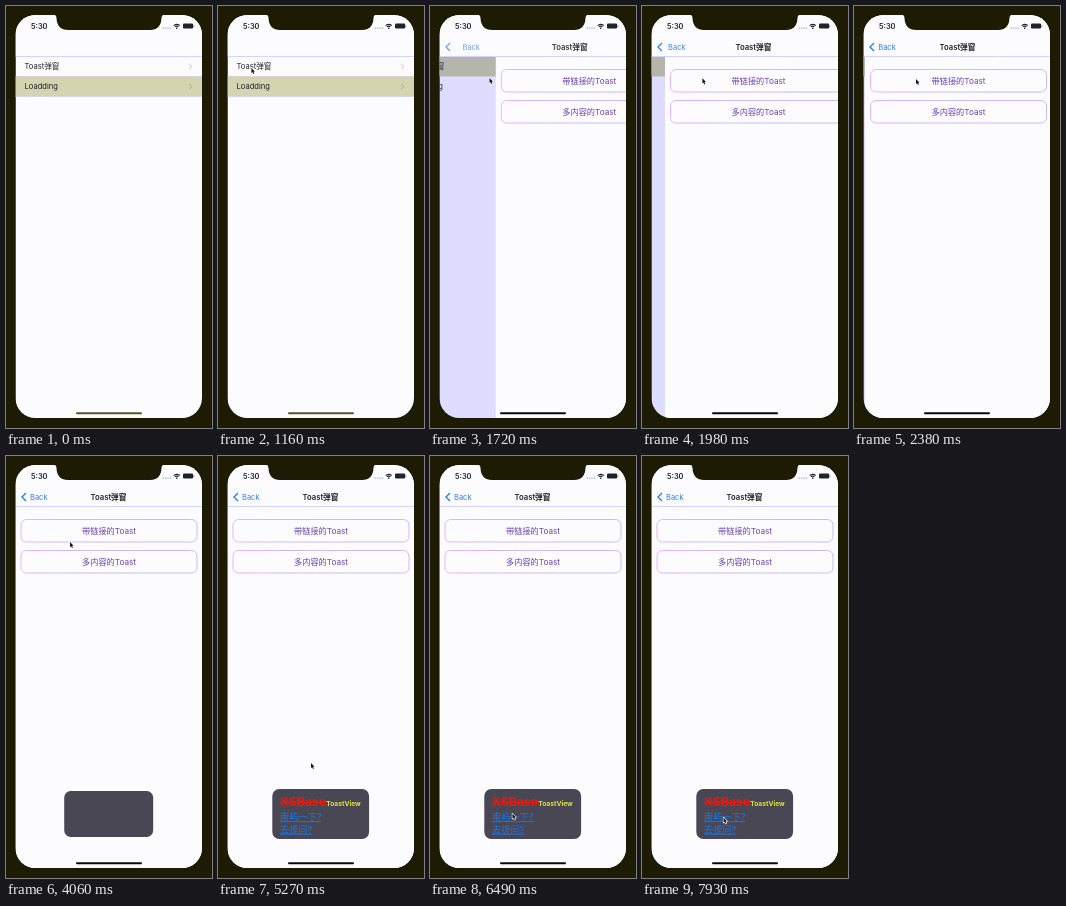
Animation, 206 px wide and 422 px high, one loop 8000 ms. Source, as an HTML page with a canvas:

```html
<!DOCTYPE html>
<html lang="zh">
<head>
<meta charset="utf-8">
<style>
html, body { margin: 0; width: 100%; height: 100%; overflow: hidden; background: #1d1b03; }
canvas { display: block; width: 206px; height: 422px; }
</style>
</head>
<body>
<canvas id="stage"></canvas>
<script>
const W = 206, H = 422, LOOP = 8000;
const PUSH = 1503, TAP = 1340, TOAST = 3900;
const LEFT = 9.5, RIGHT = 196, SPAN = RIGHT - LEFT;
const SANS = 'Inter, "Noto Sans CJK SC", "Noto Sans CJK", sans-serif';
const INK = '#22222a', PAPER = '#fcfcff', RULE = '#d2d0ff', BLUE = '#2f7df0';
const BEZEL = '#1d1b03';

const canvas = document.getElementById('stage');
const ctx = canvas.getContext('2d');
const dpr = window.devicePixelRatio || 1;
canvas.width = Math.round(W * dpr);
canvas.height = Math.round(H * dpr);

const clamp = v => Math.max(0, Math.min(1, v));
const easeOut = v => 1 - (1 - v) ** 2;
const smooth = v => v * v * (3 - 2 * v);

// Pointer tip: time, x, y
const route = [
  [450, 96, 150], [1000, 33, 62], [1400, 34, 62], [1720, 59.5, 72], [2380, 62, 73],
  [3400, 63, 73], [4060, 64, 86], [4400, 65, 88], [5150, 93, 305], [5270, 93, 307],
  [5500, 93, 308], [5920, 86, 340], [6720, 81.5, 362], [7930, 81.5, 361.5]
];

function box(x, y, w, h, color) {
  ctx.fillStyle = color;
  ctx.fillRect(x, y, w, h);
}

function roundBox(x, y, w, h, r) {
  ctx.beginPath();
  ctx.roundRect(x, y, w, h, r);
}

function text(str, x, y, size, color, weight = 400, align = 'left') {
  ctx.font = `${weight} ${size}px ${SANS}`;
  ctx.textAlign = align;
  ctx.textBaseline = 'alphabetic';
  ctx.fillStyle = color;
  ctx.fillText(str, x, y);
  return ctx.measureText(str).width;
}

function stroke(points, color, width) {
  ctx.beginPath();
  points.forEach(([x, y], i) => i ? ctx.lineTo(x, y) : ctx.moveTo(x, y));
  ctx.strokeStyle = color;
  ctx.lineWidth = width;
  ctx.stroke();
}

function faded(alpha, draw) {
  ctx.save();
  ctx.globalAlpha *= alpha;
  draw();
  ctx.restore();
}

function drawRow(label, y, fill, ruleAlpha) {
  if (fill) box(LEFT, y, SPAN, 20, fill);
  text(label, 18.5, y + 12.7, 7.6, INK);
  stroke([[183, y + 7.3], [186, y + 10], [183, y + 12.7]], fill ? '#a9a8a4' : '#c2c2ce', 0.9);
  faded(ruleAlpha, () => box(LEFT, y + 19.5, SPAN, 0.8, RULE));
}

function drawList(t, progress) {
  const tapped = t >= TAP;
  const dim = clamp(progress / 0.7);
  ctx.save();
  ctx.translate(-0.3 * SPAN * progress, 0);
  drawRow('Toast弹窗', 50.5, tapped && '#cbcd9a', 1 - dim);
  drawRow('Loadding', 70.5, !tapped && '#d5d4b0', 1 - dim);
  ctx.restore();
  box(LEFT, 51, SPAN, 362, `rgba(70, 60, 255, ${0.17 * dim})`);
}

function drawButton(label, y) {
  const edge = ctx.createLinearGradient(15, 0, 191, 0);
  edge.addColorStop(0, '#e2aef8');
  edge.addColorStop(0.25, '#c8b2f8');
  edge.addColorStop(1, '#c4b2f6');
  roundBox(15, y, 176, 22.5, 5.5);
  ctx.strokeStyle = edge;
  ctx.lineWidth = 0.9;
  ctx.stroke();
  text(label, 103, y + 14.2, 8.2, '#6a42b4', 400, 'center');
}

function drawPage(offset) {
  ctx.save();
  ctx.translate(offset, 0);
  box(LEFT, 51, SPAN, 362, PAPER);
  drawButton('带链接的Toast', 63.5);
  drawButton('多内容的Toast', 94.5);
  ctx.restore();
}

function drawNav(offset, progress) {
  box(LEFT, 9, SPAN, 41.5, PAPER);
  box(LEFT, 50, SPAN, 0.9, RULE);
  if (progress <= 0) return;
  faded(progress, () => {
    stroke([[20, 37], [16, 41], [20, 45]], BLUE, 1.4);
    text('Back', 24 + offset * 0.15, 43.7, 7.5, BLUE);
  });
  faded(clamp(progress * 1.3), () => {
    text('Toast弹窗', 102.5 + offset * 0.66, 43.7, 7.7, INK, 600, 'center');
  });
}

function drawStatus() {
  text('5:30', 25, 23.2, 7.4, INK, 600);
  for (let i = 0; i < 4; i++) box(156.5 + i * 2.4, 21.6, 1.5, 1.1, '#a3a3c8');

  ctx.strokeStyle = INK;
  ctx.lineWidth = 1.2;
  for (const r of [2.2, 4.1]) {
    ctx.beginPath();
    ctx.arc(170.7, 22.4, r, -Math.PI * 0.76, -Math.PI * 0.24);
    ctx.stroke();
  }
  box(170, 21.6, 1.4, 1.3, INK);

  roundBox(177, 17.6, 10.2, 5, 1.3);
  ctx.fillStyle = INK;
  ctx.fill();
  box(187.6, 19.2, 0.7, 1.8, '#77777f');
}

function drawNotch() {
  ctx.beginPath();
  ctx.moveTo(47, 8);
  ctx.quadraticCurveTo(50.5, 9, 50.5, 12);
  ctx.quadraticCurveTo(51, 24, 62, 24);
  ctx.lineTo(144, 24);
  ctx.quadraticCurveTo(155, 24, 155.5, 12);
  ctx.quadraticCurveTo(155.5, 9, 159, 8);
  ctx.fillStyle = BEZEL;
  ctx.fill();
}

function link(str, y) {
  const w = text(str, 62, y, 9.2, '#1478ee');
  box(62, y + 1, w, 0.9, '#1478ee');
}

function drawToast(t) {
  if (t < TOAST) return;
  const p = clamp((t - TOAST) / 225);
  ctx.save();
  ctx.translate(102.7, 358);
  ctx.scale(easeOut(p), easeOut(p));
  ctx.translate(-102.7, -358);
  roundBox(54.3, 333, 96.8, 50, 7);
  ctx.fillStyle = '#484753';
  ctx.fill();
  if (p === 1) {
    const w = text('XSBase', 62, 350.3, 12.4, '#f0190c', 600);
    box(62, 345.8, w, 0.9, '#f0190c');
    text('ToastView', 62 + w, 350.3, 6.7, '#e6e23c', 700);
    link('南屿一下?', 364.2);
    link('去提问?', 376.7);
  }
  ctx.restore();
}

function drawPointer(t) {
  if (t < route[0][0]) return;
  let i = route.findIndex(k => k[0] > t);
  if (i < 0) i = route.length;
  const a = route[i - 1], b = route[i] || a;
  const p = a === b ? 0 : smooth((t - a[0]) / (b[0] - a[0]));
  ctx.save();
  ctx.translate(a[1] + (b[1] - a[1]) * p, a[2] + (b[2] - a[2]) * p);
  ctx.scale(0.8, 0.8);
  ctx.beginPath();
  ctx.moveTo(0, 0);
  ctx.lineTo(0, 6.4);
  ctx.lineTo(1.4, 5.2);
  ctx.lineTo(2.5, 7.6);
  ctx.lineTo(3.6, 7.1);
  ctx.lineTo(2.6, 4.8);
  ctx.lineTo(4.5, 4.6);
  ctx.closePath();
  ctx.lineJoin = 'round';
  ctx.strokeStyle = '#fff';
  ctx.lineWidth = 1.5;
  ctx.stroke();
  ctx.fillStyle = '#15151c';
  ctx.fill();
  ctx.restore();
}

function draw(t) {
  const pushed = t >= PUSH;
  let offset = pushed ? SPAN * Math.exp((PUSH - t) / 182) : SPAN;
  if (t > 2530) offset = 0;
  const progress = 1 - offset / SPAN;

  ctx.setTransform(dpr, 0, 0, dpr, 0, 0);
  box(0, 0, W, H, BEZEL);
  ctx.save();
  roundBox(LEFT, 9, SPAN, 403, 20);
  ctx.clip();
  box(LEFT, 9, SPAN, 403, PAPER);
  if (offset > 0) drawList(t, progress);
  if (pushed) drawPage(offset);
  drawNav(offset, progress);
  drawStatus();
  drawNotch();
  drawToast(t);
  roundBox(70, 406.2, 66, 2.1, 1);
  ctx.fillStyle = pushed ? '#08080a' : '#56542a';
  ctx.fill();
  ctx.restore();
  drawPointer(t);
}

const start = performance.now();
function tick() {
  draw((performance.now() - start) % LOOP);
  requestAnimationFrame(tick);
}
tick();
</script>
</body>
</html>
```
